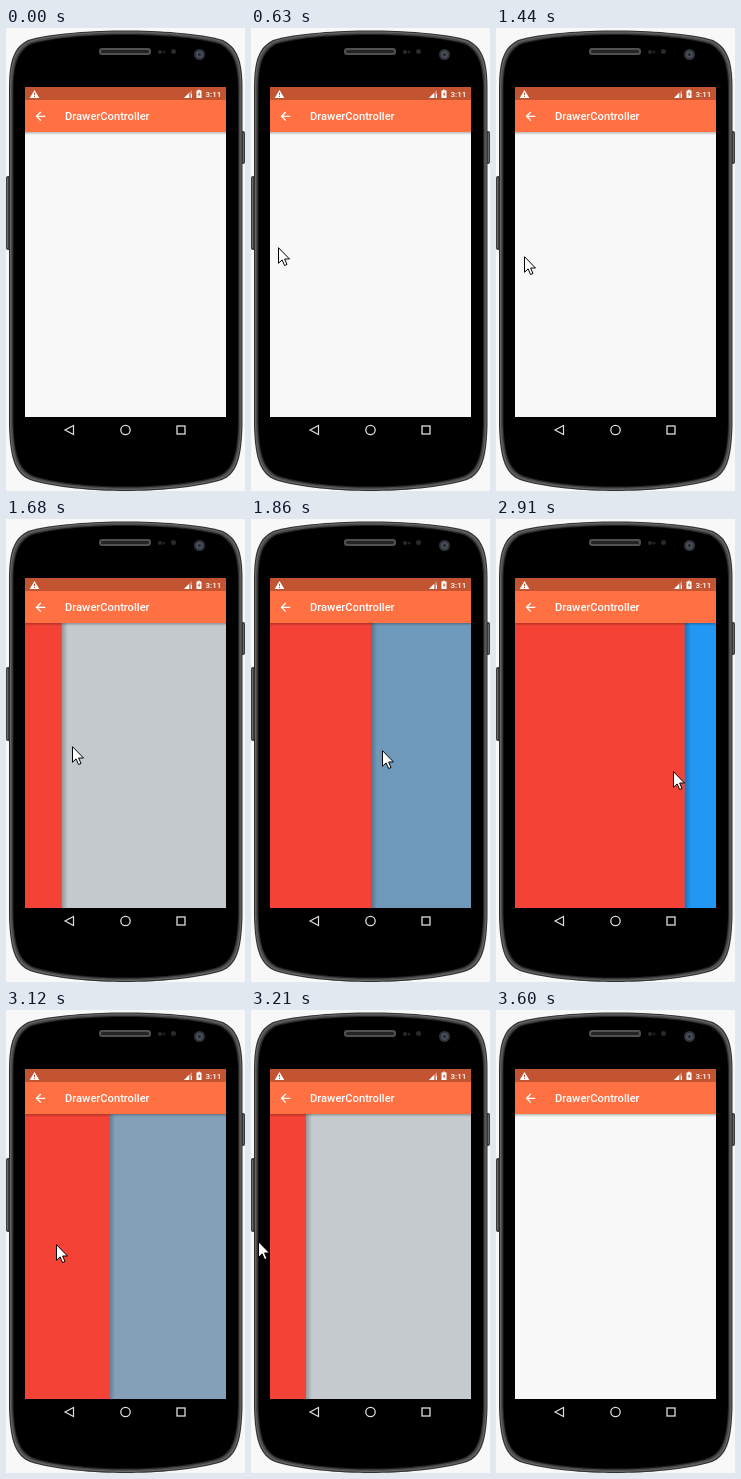
An HTML page with a canvas that plays this animation: 239 by 463 pixels, repeating every 3.93 s.

```html
<!DOCTYPE html>
<html lang="en">
<head>
<meta charset="utf-8">
<title>Drawer</title>
<style>
html, body { margin: 0; width: 100%; height: 100%; overflow: hidden; background: #f8f8f8; }
canvas { display: block; }
</style>
</head>
<body>
<canvas id="stage" width="239" height="463"></canvas>
<script>
const ctx = document.getElementById('stage').getContext('2d');
const LOOP = 3930, STEP = 30;
const SCREEN = { x: 19, y: 59, w: 201, h: 330 };
const BODY_TOP = 104, BODY_BOTTOM = 389, DRAWER_WIDTH = 169.7;

// Keys: time, tip x, tip y
const pointer = [
  [90, 212, 64], [210, 176, 95], [330, 112, 151], [450, 50, 204], [570, 28, 219],
  [630, 27, 219], [780, 21, 222], [900, 24, 225], [1020, 28, 227], [1410, 28, 227],
  [1440, 28, 228], [1530, 33, 228], [1650, 57, 227], [1770, 100, 227], [1860, 131, 231],
  [1950, 154, 244], [2070, 172, 261], [2250, 180, 262], [2490, 182, 259],
  [2730, 182, 253], [2880, 182, 253], [2910, 177, 252], [3000, 142, 245],
  [3120, 50, 234], [3210, 7, 231], [3240, 5, 229], [3300, 48, 207], [3360, 137, 176],
  [3420, 210, 156], [3510, 226, 150], [3600, 239, 145]
];
// Keys: time, visible drawer width
const drawer = [
  [1530, 0], [1590, 11], [1650, 27], [1770, 70], [1860, 101], [1890, 134], [1920, 157],
  [1950, 166], [2070, 168], [2490, DRAWER_WIDTH], [2940, DRAWER_WIDTH], [3000, 152],
  [3120, 84], [3210, 36], [3240, 20], [3270, 10], [3330, 2.5], [3420, 0]
];

// Monotone cubic interpolation of one column of a key list
function sample(keys, t, col = 1) {
  const last = keys.length - 1;
  if (t <= keys[0][0]) return keys[0][col];
  if (t >= keys[last][0]) return keys[last][col];
  const i = keys.findIndex(k => k[0] > t) - 1;
  const slope = j => (keys[j + 1][col] - keys[j][col]) / (keys[j + 1][0] - keys[j][0]);
  const tangent = j => {
    if (j === 0 || j === last) return 0;
    const a = slope(j - 1), b = slope(j);
    return a * b > 0 ? 2 * a * b / (a + b) : 0;
  };
  const span = keys[i + 1][0] - keys[i][0], u = (t - keys[i][0]) / span;
  const u2 = u * u, u3 = u2 * u;
  return keys[i][col] * (2 * u3 - 3 * u2 + 1) + keys[i + 1][col] * (3 * u2 - 2 * u3) +
    span * (tangent(i) * (u3 - 2 * u2 + u) + tangent(i + 1) * (u3 - u2));
}

function rect(x, y, w, h, color) {
  ctx.fillStyle = color;
  ctx.fillRect(x, y, w, h);
}
function roundRect(x, y, w, h, r, color) {
  ctx.beginPath();
  ctx.roundRect(x, y, w, h, r);
  ctx.fillStyle = color;
  ctx.fill();
}
function disc(x, y, r, color) {
  ctx.beginPath();
  ctx.arc(x, y, r, 0, Math.PI * 2);
  ctx.fillStyle = color;
  ctx.fill();
}
function shape(path, fill, stroke, width = 1, x = 0, y = 0) {
  const p = new Path2D(path);
  ctx.save();
  ctx.translate(x, y);
  if (fill) { ctx.fillStyle = fill; ctx.fill(p); }
  if (stroke) { ctx.strokeStyle = stroke; ctx.lineWidth = width; ctx.stroke(p); }
  ctx.restore();
}
function text(str, x, y, size) {
  ctx.font = `500 ${size}px Roboto, sans-serif`;
  ctx.fillStyle = '#fff';
  ctx.fillText(str, x, y);
}
function fade(x, y, w, h, dx, dy, alpha) {
  const g = ctx.createLinearGradient(x, y, x + dx, y + dy);
  g.addColorStop(0, `rgba(0,0,0,${alpha})`);
  g.addColorStop(1, 'rgba(0,0,0,0)');
  rect(x, y, w, h, g);
}

const CASE = 'M3 60C3 32 8 19 22 12C45 5 88 2.5 119.5 2.5C151 2.5 194 5 217 12' +
  'C231 19 236.5 32 236.5 60L236.5 398C235.5 433 230 446 216 452' +
  'C190 460 150 463 119.5 463C89 463 49 460 24 452C10 446 4 433 3 398Z';

function caseLayer(inset, color) {
  ctx.save();
  ctx.translate(119.75, 232.5);
  ctx.scale(1 - inset / 117, 1 - inset / 230);
  ctx.translate(-119.75, -232.5);
  shape(CASE, color);
  ctx.restore();
}

function drawPhone() {
  roundRect(0, 148, 6, 74, 2, '#3b3b3b');
  rect(1, 150, 1, 70, '#686868');
  roundRect(233, 103, 6, 33, 2, '#3b3b3b');
  rect(237, 105, 1, 29, '#686868');
  [[0, '#303030'], [1, '#666'], [2, '#4a4a4a'], [3.5, '#222'], [4.5, '#000']]
    .forEach(([inset, color]) => caseLayer(inset, color));

  roundRect(93, 20, 52, 7, 3, '#505050');
  roundRect(95, 22, 48, 3, 1.5, '#242424');
  disc(154, 24, 2, '#292929');
  disc(158, 24, 1.5, '#202020');
  disc(167.5, 23.5, 2.5, '#292929');
  disc(193.5, 26.5, 5.5, '#30343a');
  disc(193.5, 26.5, 3.5, '#484e58');
  disc(193.5, 26.5, 1.5, '#22262d');

  shape('M67.5 397.5V406.5L59 402Z', null, '#ddd', 1.2);
  ctx.beginPath();
  ctx.arc(119.5, 402, 4.7, 0, Math.PI * 2);
  ctx.strokeStyle = '#ddd';
  ctx.lineWidth = 1.3;
  ctx.stroke();
  ctx.strokeRect(171, 398, 8, 8);
}

function drawBars() {
  rect(SCREEN.x, SCREEN.y, SCREEN.w, 13, '#c25432');
  rect(SCREEN.x, 72, SCREEN.w, BODY_TOP - 72, '#ff7043');
  shape('M28.5 62L33.3 70H23.7Z', '#fff');
  rect(28, 64.7, 1, 2.5, '#c25432');
  rect(28, 68, 1, 1, '#c25432');
  shape('M186 62V70H178Z', 'rgba(255,255,255,.35)');
  shape('M183 65V70H178Z', '#fff');
  rect(185, 66, 1, 4, '#fff');
  rect(190.5, 62.5, 5, 7.5, '#fff');
  rect(192, 61.7, 2, 1, '#fff');
  shape('M193.8 63.5L191.7 66.6H193L192.4 69L194.6 65.8H193.3Z', '#c25432');
  text('3:11', 199.5, 69, 8);
  shape('M39.3 88.3H30.8M34.8 84L30.5 88.3L34.8 92.6', null, '#fff', 1.3);
  text('DrawerController', 59, 92.3, 11.16);
}

function drawBody(width) {
  const height = BODY_BOTTOM - BODY_TOP;
  rect(SCREEN.x, BODY_TOP, SCREEN.w, height, '#f8f8f8');
  if (width > 0.3) {
    // The scrim goes from transparent black to opaque blue
    const k = Math.min(1, width / (DRAWER_WIDTH - 1.7));
    const [r, g, b] = [33, 150, 243].map(c => Math.round(c * k));
    rect(SCREEN.x, BODY_TOP, SCREEN.w, height, `rgba(${r},${g},${b},${k})`);
    const edge = SCREEN.x + width;
    fade(edge, BODY_TOP, 6, height, 6, 0, 0.25);
    rect(SCREEN.x, BODY_TOP, width, height, '#f44336');
  }
  fade(SCREEN.x, BODY_TOP, SCREEN.w, 3, 0, 3, 0.26);
}

function drawPointer(t) {
  if (t < 90 || t >= 3600) return;
  const x = Math.round(sample(pointer, t, 1)), y = Math.round(sample(pointer, t, 2));
  shape('M.5 .7V16.3L4.1 12.9L6.6 18.5L9 17.5L6.6 12H11.5Z', '#fff', '#000', 1, x, y);
}

function render(now) {
  const t = Math.floor(now % LOOP / STEP) * STEP;
  rect(0, 0, 239, 463, '#f8f8f8');
  drawPhone();
  drawBody(sample(drawer, t));
  drawBars();
  drawPointer(t);
}

const start = performance.now();
function tick() {
  render(performance.now() - start);
  requestAnimationFrame(tick);
}
tick();
</script>
</body>
</html>
```
